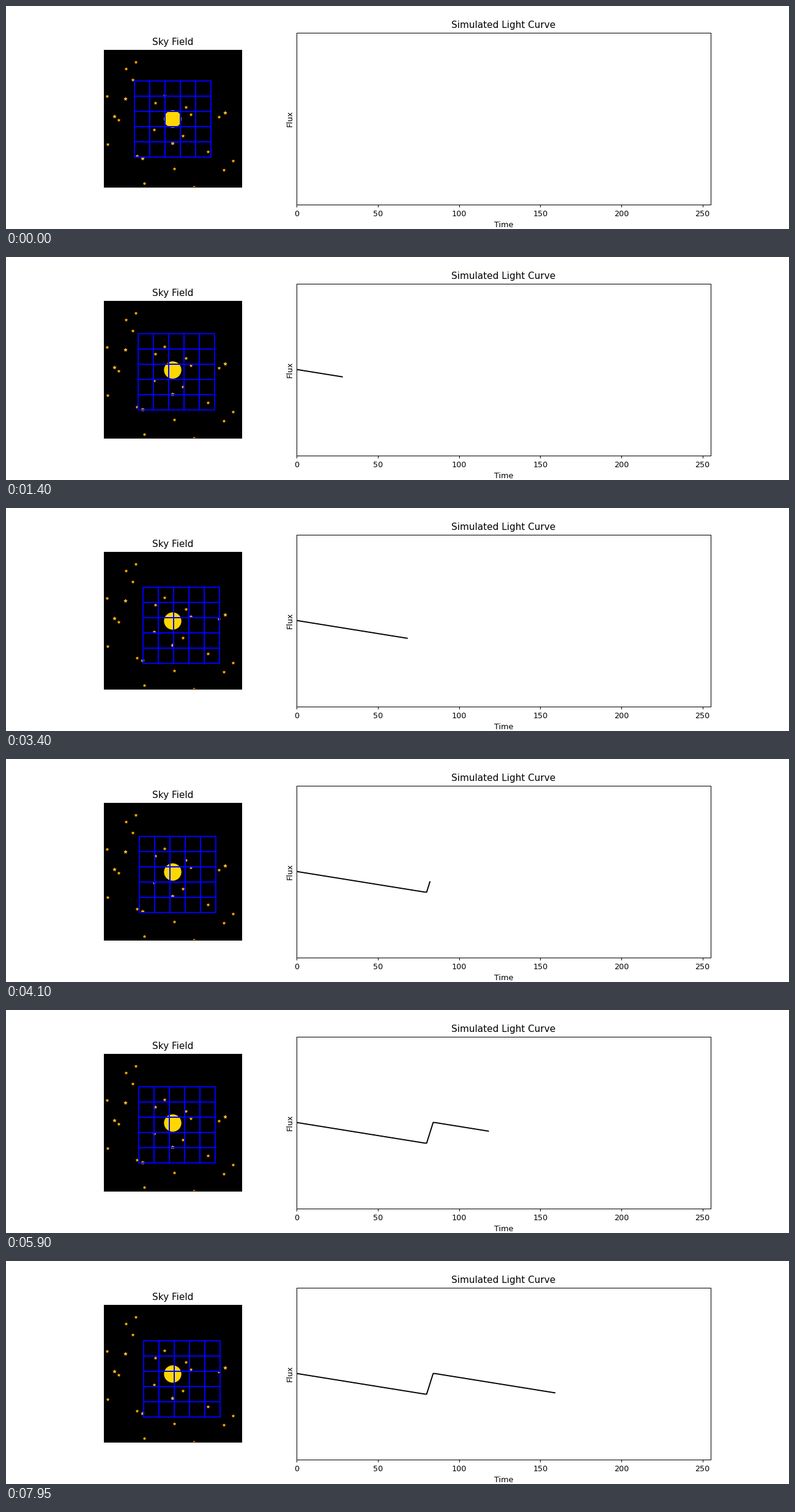
Recreate the animation shown at these times as a matplotlib script. Size 1280 px wide and 366 px high, loop 8 s.

```python
import numpy as np
import matplotlib.pyplot as plt
from matplotlib.animation import FuncAnimation
from matplotlib.patches import Rectangle

WIDTH, HEIGHT = 1280, 366
DPI = WIDTH / 14
FRAMES, INTERVAL = 160, 50
DURATION = 255              # length of the time axis
FIELD, CELLS = 9, 5         # sky width and detector width, in cells
ORIGIN = np.array([2.016, 1.98])    # lower left corner of the detector
SHIFT = np.array([0.64, -0.347])    # full pointing drift, in cells
DIP = 0.24                  # flux lost at full drift


def ring(count, angles, radii, ease):
    """Stars along an arc round the centre, gathered at its ends by ease."""
    step = np.linspace(0, 1, count)
    eased = (1 - np.cos(np.pi * step)) / 2
    angle = np.radians(np.interp(step + ease * (eased - step), [0, 1], angles))
    radius = np.interp(step, [0, 1], radii)
    return FIELD / 2 + radius * np.array([np.cos(angle), np.sin(angle)])


faint = np.hstack([
    ring(8, (123, 325), (4.4, 4.8), ease=1),
    ring(6, (136, 362), (3.64, 3.02), ease=0),
    ring(6, (110, 401), (1.6, 1.13), ease=1),
])
bright = [(1.40, 5.82), (0.68, 4.66), (2.53, 1.88), (4.47, 2.90), (7.90, 4.88)]

# Slow drift followed by a quick reset, three times over.
cycle = np.concatenate([np.linspace(0, 1, 80), np.linspace(1, 0, 5)])
drift = np.tile(cycle, 3)
time = np.arange(DURATION)
flux = -DIP * drift

fig, (sky, curve) = plt.subplots(
    1, 2, figsize=(WIDTH / DPI, HEIGHT / DPI), dpi=DPI,
    gridspec_kw={"width_ratios": [1, 3]})
fig.subplots_adjust(left=0.1247, right=0.9, bottom=0.1103, top=0.8806)

sky.set(title="Sky Field", facecolor="black", aspect="equal",
        xlim=(0, FIELD), ylim=(0, FIELD), xticks=[], yticks=[])
sky.scatter(*faint, s=10, marker="*", color="orange", linewidth=0.8)
sky.scatter(*zip(*bright), s=17, marker="*", color="#ffb931", linewidth=0.8)
sky.scatter(FIELD / 2, FIELD / 2, s=500, color="gold", linewidth=0)

pixels = []
for row in range(CELLS):
    for col in range(CELLS):
        cell = Rectangle((0, 0), 1, 1, fill=False, edgecolor="blue",
                         linewidth=1.5, zorder=3)
        pixels.append((sky.add_patch(cell), (col, row)))

curve.set(title="Simulated Light Curve", xlabel="Time", ylabel="Flux",
          xlim=(0, DURATION), ylim=(-1, 1), yticks=[])
trace, = curve.plot([], [], color="black", linewidth=1.5)


def draw(frame):
    corner = ORIGIN + drift[frame] * SHIFT
    for cell, place in pixels:
        cell.set_xy(corner + place)
    # A single sample has no length, so nothing shows at the start.
    end = frame + 1 if frame else 0
    trace.set_data(time[:end], flux[:end])
    return [trace] + [cell for cell, _ in pixels]


anim = FuncAnimation(fig, draw, frames=FRAMES, interval=INTERVAL,
                     repeat=True, repeat_delay=0)
plt.show()
```
